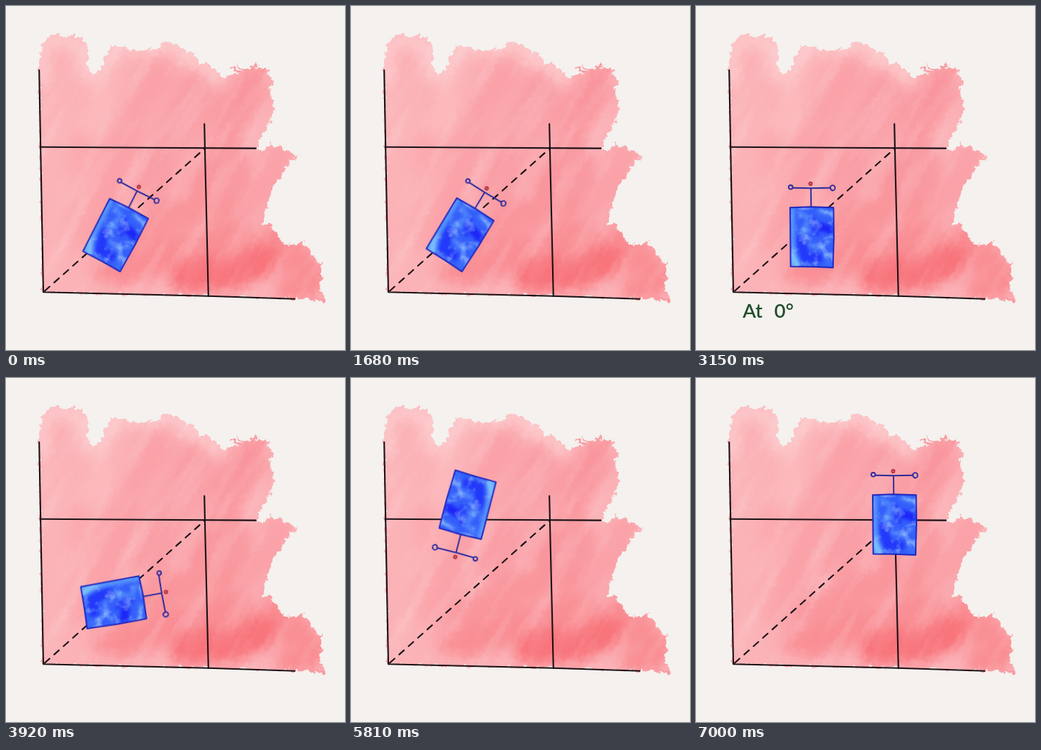
These frames come from a looping animation (472x480 px, 7.77 s). An HTML page:

```html
<!DOCTYPE html>
<html lang="en">
<head>
<meta charset="utf-8">
<title>Turning along the path</title>
<style>
  html, body { margin: 0; width: 100%; height: 100%; overflow: hidden; background: #f4f1ee; }
  svg { display: block; width: 472px; height: 480px; }
  .ink { fill: none; stroke: #1b1115; stroke-width: 2.1; stroke-linecap: round; stroke-linejoin: round; }
  .wash path { fill: none; stroke-linecap: round; stroke-linejoin: round; }
  .frame { stroke: #2c2a9e; stroke-width: 1.9; fill: none; stroke-linecap: round; stroke-linejoin: round; }
  .label { font: 600 27px Lato, "Open Sans", sans-serif; fill: #1f4f2c; visibility: hidden; }

  .move, .turn, .label { animation: 7770ms linear infinite; }
  .move { animation-name: move; }
  .turn { animation-name: turn; }
  .l1 { animation-name: l1; }
  .l2 { animation-name: l2; }
  .l3 { animation-name: l3; }

  /* One step lasts 70 ms, 111 steps to a loop */
  @keyframes turn {
    0%       { transform: rotate(27.4deg); }
    0.9009%  { transform: rotate(27.4deg); animation-timing-function: steps(7, start); }
    7.2072%  { transform: rotate(47.5deg); }
    17.1171% { transform: rotate(47.5deg); animation-timing-function: steps(12, start); }
    27.9279% { transform: rotate(15.5deg); }
    36.9369% { transform: rotate(15.5deg); animation-timing-function: steps(5, start); }
    41.4414% { transform: rotate(0deg); }
    47.7477% { transform: rotate(0deg); animation-timing-function: steps(9, start); }
    55.8558% { transform: rotate(180deg); }
    74.7747% { transform: rotate(180deg); animation-timing-function: steps(6, start); }
    80.1801% { transform: rotate(270deg); }
    85.5855% { transform: rotate(270deg); animation-timing-function: steps(6, start); }
    90.9909%, 100% { transform: rotate(360deg); }
  }
  @keyframes move {
    0%       { transform: translate(157.3px, 309px); }
    36.9369% { transform: translate(157.3px, 309px); animation-timing-function: steps(5, start); }
    41.4414% { transform: translate(161px, 311px); }
    55.8558% { transform: translate(161px, 311px); animation-timing-function: steps(10, start); }
    64.8648% { transform: translate(160px, 188.5px); }
    80.1801% { transform: translate(160px, 188.5px); animation-timing-function: steps(6, start); }
    85.5855%, 100% { transform: translate(276px, 193px); }
  }
  @keyframes l1 {
    0%, 17.1171%, 100% { visibility: hidden; animation-timing-function: step-end; }
    6.3063% { visibility: visible; animation-timing-function: step-end; }
  }
  @keyframes l2 {
    0%, 36.9369%, 100% { visibility: hidden; animation-timing-function: step-end; }
    27.027% { visibility: visible; animation-timing-function: step-end; }
  }
  @keyframes l3 {
    0%, 47.7477%, 100% { visibility: hidden; animation-timing-function: step-end; }
    40.5405% { visibility: visible; animation-timing-function: step-end; }
  }
</style>
</head>
<body>
<svg viewBox="0 0 472 480" xmlns="http://www.w3.org/2000/svg">
  <defs>
    <filter id="ragged" x="0" y="0" width="472" height="480" filterUnits="userSpaceOnUse">
      <feTurbulence type="fractalNoise" baseFrequency=".13" numOctaves="3" seed="4"/>
      <feDisplacementMap in="SourceGraphic" scale="11" xChannelSelector="R" yChannelSelector="G"/>
    </filter>
    <filter id="soft" x="0" y="0" width="472" height="480" filterUnits="userSpaceOnUse">
      <feGaussianBlur stdDeviation="9"/>
    </filter>
    <filter id="streaks" x="-400" y="-400" width="1100" height="1100" filterUnits="userSpaceOnUse">
      <feTurbulence type="fractalNoise" baseFrequency=".008 .045" numOctaves="3" seed="9"/>
      <feColorMatrix values="0 0 0 0 1  0 0 0 0 .82  0 0 0 0 .83  1.9 0 0 0 -.8"/>
    </filter>
    <filter id="wet" x="-50%" y="-50%" width="200%" height="200%">
      <feGaussianBlur stdDeviation="2"/>
    </filter>
    <filter id="mottle" x="0" y="0" width="100%" height="100%">
      <feTurbulence type="fractalNoise" baseFrequency=".07" numOctaves="3" seed="6"/>
      <feColorMatrix values="0 0 0 0 .44  0 0 0 0 .68  0 0 0 0 1  4 0 0 0 -2"/>
    </filter>
    <clipPath id="paper">
      <path id="blot" d="M46 92 46 74 53 48 66 39 79 43 93 40 110 48 114 62 113 82 121 97 132 88
        138 70 147 56 161 56 186 63 205 60 222 51 238 53 252 63 264 70 270 82 284 82 298 94 303 101
        318 94 330 90 346 84 362 89 370 101 368 122 374 140 370 160 356 180 349 198 356 205 368 191
        380 196 392 202 405 208 388 230 372 252 362 280 356 303 372 307 382 328 396 334 412 330
        425 342 430 352 440 362 440 380 436 388 442 411 420 409 404 408 280 405 52 399 47 200Z"/>
    </clipPath>
    <clipPath id="box"><path d="M131 281H191.5L191 322 191.5 365 131.5 364Z"/></clipPath>
  </defs>

  <rect width="472" height="480" fill="#f4f1ee"/>

  <g filter="url(#ragged)">
    <g clip-path="url(#paper)">
      <use href="#blot" fill="#fbb0b5"/>
      <g class="wash" filter="url(#soft)">
        <path d="M62 130 66 260 76 380" stroke="#fbb3b7" stroke-width="36"/>
        <path d="M110 180 105 330" stroke="#fbaaaf" stroke-width="40"/>
        <path d="M150 65 118 170" stroke="#fcbabd" stroke-width="28"/>
        <path d="M215 95 175 150 150 240 130 330" stroke="#faa2a8" stroke-width="46"/>
        <path d="M270 110 225 190 200 260" stroke="#f99ea5" stroke-width="52"/>
        <path d="M345 110 305 160 275 250" stroke="#f9959c" stroke-width="50"/>
        <path d="M310 220 320 300" stroke="#f99aa0" stroke-width="60"/>
        <path d="M382 212 345 290" stroke="#faa2a8" stroke-width="42"/>
        <path d="M165 330 240 290 300 285" stroke="#f9959b" stroke-width="44"/>
        <path d="M140 380 230 345 330 325" stroke="#f98f95" stroke-width="46"/>
        <path d="M380 325 425 380 400 395" stroke="#f98c92" stroke-width="44"/>
        <path d="M250 375 310 372 355 355" stroke="#f8737a" stroke-width="48"/>
        <path d="M75 388 150 393" stroke="#fbb5b8" stroke-width="14"/>
        <path d="M50 105V55L80 45 108 58 116 100 152 58 232 55 266 78 296 100" stroke="#fdc9cb" stroke-width="20"/>
      </g>
      <g transform="rotate(-60 236 240)">
        <rect x="-150" y="-150" width="780" height="780" filter="url(#streaks)" opacity=".28"/>
      </g>
    </g>
    <path d="M314 87 326 92M322 84 334 92M340 90 350 80M344 94 364 87M430 362 441 358M428 376 442 381M420 404 444 412"
      fill="none" stroke="#f99aa0" stroke-width="2.5"/>
  </g>

  <g class="ink">
    <path d="M46.2 89.500 48.200 200 52 399.300 282 404.800 402 408.800"/>
    <path d="M47.500 196.700 200 197.700 348 198.600"/>
    <path d="M276.200 164.500 277.500 225 281.800 405"/>
    <path d="M54 397.500 276.500 199" stroke-dasharray="9 8.500"/>
  </g>

  <text class="label l1" x="166" y="438">At 45°</text>
  <text class="label l2" x="70" y="437">At an angle</text>
  <text class="label l3" y="435"><tspan x="65">At</tspan><tspan x="109">0°</tspan></text>

  <g class="move"><g class="turn"><g transform="translate(-161 -311)">
    <g clip-path="url(#box)">
      <rect x="129" y="279" width="65" height="88" fill="#345ffa"/>
      <g filter="url(#wet)" fill="none" stroke-linecap="round">
        <path d="M134 284V362" stroke="#5796fb" stroke-width="7"/>
        <path d="M135 350 140 361" stroke="#78bdfc" stroke-width="10"/>
        <path d="M144 288 158 297 150 312" stroke="#4c83fb" stroke-width="7"/>
        <path d="M172 286 186 290" stroke="#4b80fa" stroke-width="7"/>
        <path d="M174 308 186 312" stroke="#1c28f8" stroke-width="12"/>
        <path d="M146 326 152 350 170 352" stroke="#2137fa" stroke-width="13"/>
        <path d="M162 298 168 318" stroke="#2841fa" stroke-width="9"/>
        <path d="M186 328 172 338 158 333" stroke="#568cfb" stroke-width="4"/>
        <path d="M146 317 156 313" stroke="#6ba5fb" stroke-width="4"/>
        <path d="M182 346 185 360" stroke="#3e6dfb" stroke-width="8"/>
      </g>
      <rect x="129" y="279" width="65" height="88" filter="url(#mottle)" opacity=".5"/>
    </g>
    <g class="frame">
      <path d="M131 281.300 160 280.300 191.500 281.200 192 322 190.700 365 160 363.700 131.700 363.500Z" stroke="#1f27bd"/>
      <path d="M135 253.700 160 254.300 186.500 253.700M160 254.300 160.300 280"/>
      <circle cx="131.800" cy="252.800" r="2.800"/>
      <path d="M187 252Q190 248.500 193 251.500 195 256.500 190.500 257.500 186.500 256.500 187 252Z"/>
      <circle cx="159.500" cy="248" r="2.100" stroke="#b02c38" stroke-width="1.700" fill="#d97078"/>
    </g>
  </g></g></g>
</svg>
</body>
</html>
```
